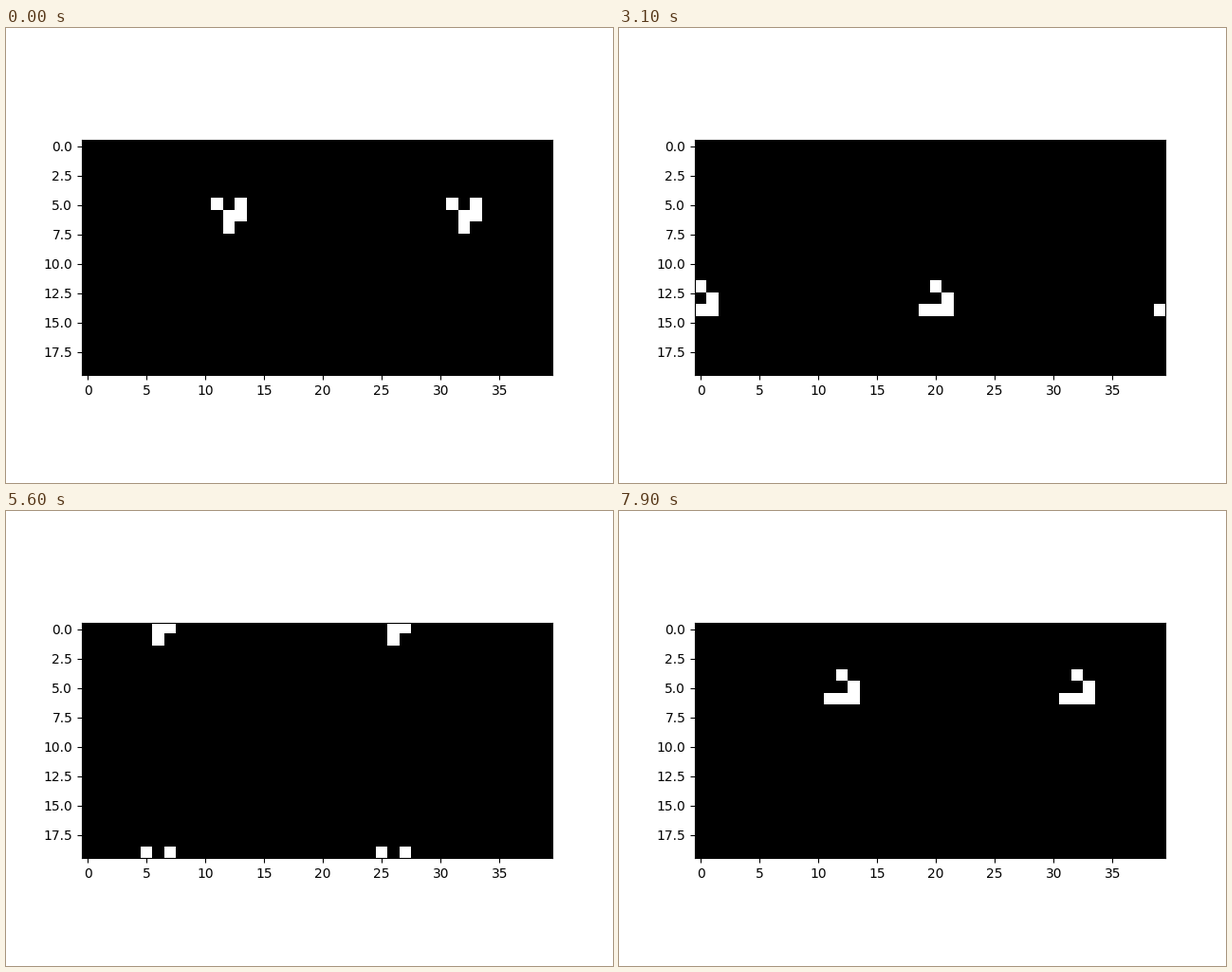
These frames come from a looping animation (640 by 480 pixels, 8 s). A matplotlib script:

```python
import matplotlib.pyplot as plt
import numpy as np
from matplotlib.animation import FuncAnimation

ROWS, COLS = 20, 40
STEPS = 80
INTERVAL = 100  # ms

GLIDER = np.array([[1, 0, 1],
                   [0, 1, 1],
                   [0, 1, 0]])


def start_grid():
    grid = np.zeros((ROWS, COLS), dtype=int)
    for col in (11, 31):
        grid[5:8, col:col + 3] = GLIDER
    return grid


def evolve(grid):
    """One Game of Life generation on a torus."""
    neighbours = sum(np.roll(grid, (dy, dx), axis=(0, 1))
                     for dy in (-1, 0, 1) for dx in (-1, 0, 1)
                     if (dy, dx) != (0, 0))
    alive = (neighbours == 3) | ((grid == 1) & (neighbours == 2))
    return alive.astype(int)


history = [start_grid()]
while len(history) < STEPS:
    history.append(evolve(history[-1]))

fig, ax = plt.subplots(figsize=(6.4, 4.8), dpi=100)
image = ax.imshow(history[0], cmap="gray", vmin=0, vmax=1,
                  interpolation="nearest")


def update(step):
    image.set_data(history[step])
    return [image]


anim = FuncAnimation(fig, update, frames=STEPS, interval=INTERVAL,
                     repeat=True, repeat_delay=0)
plt.show()
```
